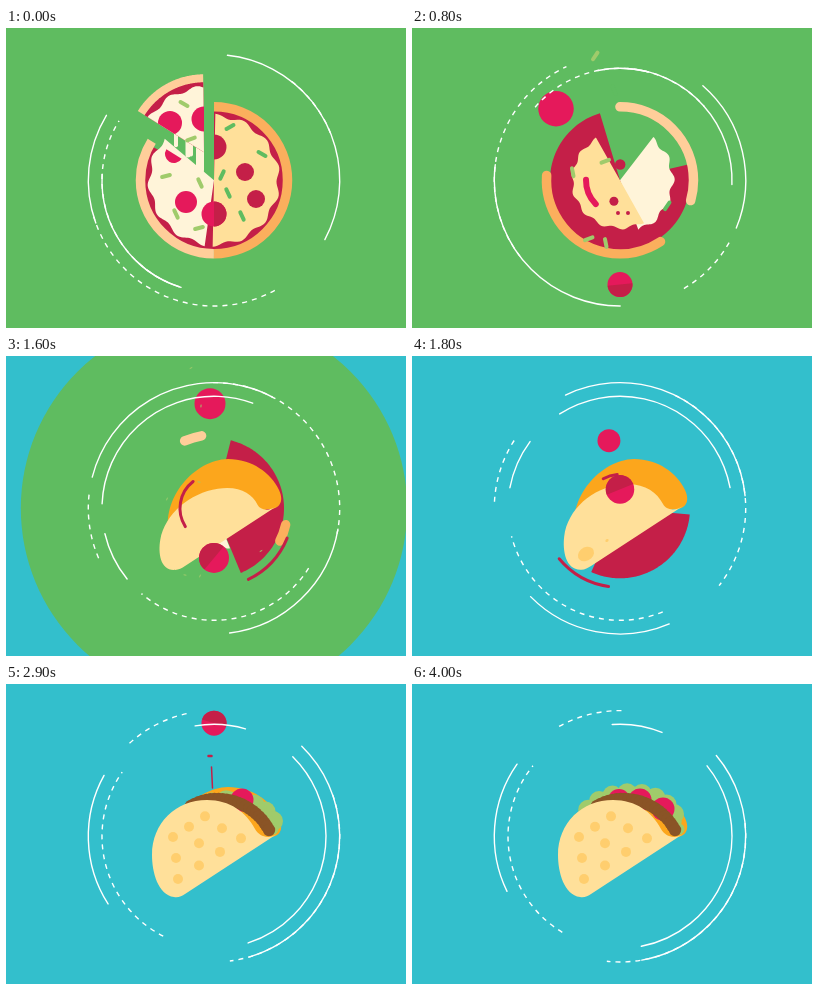
Write an HTML page with a canvas that moves like this. It is 400 px wide and 300 px high and loops after 4.1 s.

```html
<!DOCTYPE html>
<html lang="en">
<head>
<meta charset="utf-8">
<title>Pizza to taco</title>
<style>
html, body { margin: 0; width: 100%; height: 100%; overflow: hidden; background: #33bfcc; }
canvas { display: block; }
</style>
</head>
<body>
<canvas id="stage" width="400" height="300"></canvas>
<script>
const ctx = document.getElementById('stage').getContext('2d');
const LOOP = 4100, CX = 208, CY = 152.3, RAD = Math.PI / 180;
const C = {
  green: '#5fbc60', teal: '#33bfcc', leaf: '#a0cb6b', pink: '#e5195b', red: '#c41f48',
  cream: '#fff4d9', cheese: '#ffe09a', peach: '#ffce9a', crust: '#fbaf5d',
  shell: '#fca61c', dot: '#ffce6e', meat: '#8a5426'
};
let t = 0, spin = 0;

const mix = (a, b, p) => a + (b - a) * p;
const span = (a, b) => Math.max(0, Math.min(1, (t - a) / (b - a)));
const ramp = (a, b) => 0.5 - 0.5 * Math.cos(Math.PI * span(a, b));

// Smooth monotone curve through [time, value] points
function curve(points) {
  const n = points.length - 1;
  const slope = i => (points[i + 1][1] - points[i][1]) / (points[i + 1][0] - points[i][0]);
  const tangent = i => {
    if (i === 0) return slope(0);
    if (i === n) return slope(n - 1);
    const a = slope(i - 1), b = slope(i);
    return 2 * a * b / (a + b);
  };
  return time => {
    let i = 0;
    while (i < n - 1 && time >= points[i + 1][0]) i++;
    const [t0, v0] = points[i], [t1, v1] = points[i + 1];
    const h = t1 - t0, u = (time - t0) / h, w = 1 - u;
    return v0 * w * w * (1 + 2 * u) + v1 * u * u * (3 - 2 * u)
      + h * u * w * (w * tangent(i) - u * tangent(i + 1));
  };
}

// Shared turn: quick swing, then a slow drift
const spinAt = curve([[0, 0], [400, 0.091], [1200, 0.536], [1600, 0.758], [2200, 0.98], [2900, 0.989], [LOOP, 1.001]]);

function disc(x, y, r, color, from = 0, to = 360) {
  if (r <= 0) return;
  ctx.fillStyle = color;
  ctx.beginPath();
  ctx.arc(x, y, r, from * RAD, to * RAD);
  ctx.fill();
}

function line(x1, y1, x2, y2, width, color) {
  ctx.strokeStyle = color;
  ctx.lineWidth = width;
  ctx.lineCap = 'round';
  ctx.beginPath();
  ctx.moveTo(x1, y1);
  ctx.lineTo(x2, y2);
  ctx.stroke();
}

function arc(r, from, sweep, width, color, cap = 'round', dash = []) {
  if (sweep < 0.5 || width <= 0) return;
  ctx.strokeStyle = color;
  ctx.lineWidth = width;
  ctx.lineCap = cap;
  ctx.setLineDash(dash);
  ctx.beginPath();
  ctx.arc(CX, CY, r, from * RAD, (from + sweep) * RAD);
  ctx.stroke();
  ctx.setLineDash([]);
}

function sector(r, from, sweep, color, wave = 0) {
  if (sweep < 0.5) return;
  ctx.fillStyle = color;
  ctx.beginPath();
  ctx.moveTo(CX, CY);
  for (let a = 0; a <= sweep; a += sweep / 90) {
    const d = r + wave * Math.cos(14 * a * RAD), b = (from + a) * RAD;
    ctx.lineTo(CX + d * Math.cos(b), CY + d * Math.sin(b));
  }
  ctx.fill();
}

function blob(path, color) {
  ctx.fillStyle = color;
  ctx.fill(new Path2D(path));
}

// Row of discs along a cubic curve, drawn up to the given share
function bumps([x0, y0, x1, y1, x2, y2, x3, y3], n, r, color, share = 1) {
  const cubic = (a, b, c, d, u) => a * (1 - u) ** 3 + 3 * b * u * (1 - u) ** 2 + 3 * c * u * u * (1 - u) + d * u ** 3;
  for (let i = 0; i <= n * share; i++) {
    disc(cubic(x0, x1, x2, x3, i / n), cubic(y0, y1, y2, y3, i / n), r, color);
  }
}

function pop(start) {
  const p = span(start, start + 300);
  return p < 0.4 ? p * 5 : 2 - (p - 0.4) / 0.6;
}

function background() {
  ctx.fillStyle = C.teal;
  ctx.fillRect(0, 0, 400, 300);
  const p = span(1400, 1900);
  const eased = p < 0.5 ? 4 * p ** 3 : 1 - 4 * (1 - p) ** 3;
  disc(CX, CY, 261 * (1 - eased), C.green);
}

function pizza() {
  const cap = t < 150 ? 'butt' : 'round', rim = 9.5 * (1 - span(1600, 1900));
  const lag = spin ** 1.65, shrink = ramp(400, 1200);
  sector(70 * (1 - span(2200, 2500)), 270 + 590 * lag, 302 - 250 * lag, C.red);
  arc(73.5, 90 + 700 * spin ** 1.1, 122 - 188 * spin ** 2, rim, C.peach, cap);
  arc(73.5, 270 + 645 * spin ** 1.2, 180 - 232 * spin ** 1.2, rim, C.crust, cap);
  sector(mix(64.5, 41, shrink), 90 + 384 * spin ** 0.46, 122 * (1 - span(1200, 1750)), C.cream, 2);
  if (t < 1300) sector(mix(64.5, 31, shrink), 270 + 349 * spin ** 0.68, 180, C.cheese, mix(2, 1, shrink));
}

function slice() {
  if (t > 800) return;
  const lift = (t / 400) ** 1.5, y = -28 - 137 * lift;
  for (const [x, width, stretch] of [[170, 4, 85], [182, 5, 22], [185, 4, 70], [194, 8, 34]]) {
    const edge = CY + y - (198 - x) * 0.62;
    line(x, edge - 6, x, edge + 2.5 * width + stretch * t / 400, width, C.cream);
  }
  ctx.save();
  ctx.translate(-10, y);
  sector(78, 212, 58, C.peach);
  sector(70, 212, 58, C.red);
  sector(64.5, 212, 58, C.cream, 2);
  ctx.beginPath();
  ctx.moveTo(CX, CY);
  ctx.arc(CX, CY, 78, 212 * RAD, 270 * RAD);
  ctx.clip();
  disc(174, 123, 12, C.pink);
  disc(208, 119, 12.5, C.pink);
  ctx.restore();
}

function pepperoni() {
  const halved = t < 150, away = ramp(0, 1200), melt = ramp(0, 400), gone = 1 - span(1200, 1500);
  const ax = mix(239, 198, away), ay = mix(144, 134, away), bx = mix(250, 186, away), by = mix(171, 174, away);
  const bridge = 20 * span(200, 400) * (1 - span(500, 800));
  if (bridge) line(ax, ay, bx, by, bridge, C.red);
  disc(ax, ay, mix(9, 4, away) * gone, C.red);
  disc(bx, by, mix(9, 3, away) * gone, C.red);
  disc(mix(208, 254, melt), mix(119, 129, melt), 12.5 * (1 - span(0, 550)), C.red, halved ? -90 : 0, halved ? 90 : 360);
  const dx = mix(168, 211, melt), dy = mix(126, 185, melt), dr = mix(9, 6, melt) * (1 - span(400, 1000));
  if (halved) disc(dx, dy, dr, C.pink, 32, 212);
  else for (const side of [-5, 5]) disc(dx + side * melt, dy, dr, C.red);

  const swing = ramp(1200, 1600), drop = ramp(1200, 2200);
  disc(180 - 36 * melt + 60 * swing - 28 * ramp(1600, 2200),
    174 - 18 * melt - 150 * ramp(400, 1200) + 120 * drop,
    (11 + 9 * away - 13 * drop) * (1 - span(2200, 2500)), C.pink);
}

// x, y, angle, then where the herb flies to; the rest just melt away
const herbs = [
  [178, 76, 30, 185, 12], [224, 99, -30, 195, 50], [256, 126, 30, 255, 195], [160, 148, -15, 161, 143],
  [194, 155, 65, 193, 126], [170, 186, 65, 179, 219], [193, 200, -15, 194, 220],
  [185, 111, -20], [216, 147, -65], [222, 165, 65], [236, 188, 65]
];

function herb([x, y, angle, x1, y1]) {
  const flies = x1 !== undefined, p = flies ? ramp(0, 1200) : 0;
  const size = 1 - (flies ? span(1300, 1700) : span(300, 700));
  if (!size) return;
  const a = (angle + 125 * p) * RAD, dx = 4 * size * Math.cos(a), dy = 4 * size * Math.sin(a);
  const cx = mix(x, x1 ?? x, p), cy = mix(y, y1 ?? y, p);
  line(cx - dx, cy - dy, cx + dx, cy + dy, 4 * size, x < CX || t > 1000 ? C.leaf : C.green);
}

function ball() {
  if (t > 3200) return;
  const fall = Math.max(0, t - 2700);
  const y = 186 + 94 * ramp(0, 1200) - 261 * ramp(1170, 2340) + 0.0005 * fall ** 2;
  const r = 12.5 + 2.5 * Math.sin(Math.PI * span(1200, 2000)), turn = 290 * spin;
  disc(CX, y, r, C.pink);
  disc(CX, y, r, C.red, turn - 90, turn + 90);
  if (t > 2800 && t < 3000) {
    line(202.5, 72, 205.5, 72, 2.5, C.red);
    line(205.5, 83, 206.5, 104, 1.5, C.red);
  }
}

function fillings() {
  if (t > 2400) {
    const sink = 1 - ramp(2300, 3500);
    ctx.save();
    ctx.translate(10 * sink, 14 * sink);
    bumps([169, 138, 182, 101, 248, 101, 262, 130], 8, 10, C.leaf);
    ctx.restore();
    bumps([225, 113, 246, 112, 262, 128, 267, 145], 7, 5.5, C.leaf, span(2500, 2900));
  }
  disc(mix(236, 228, ramp(2900, 3500)), 116, 11.5 * span(2650, 2850), C.pink);
  disc(207, 116, 11 * span(3000, 3200), C.pink);
  disc(251, 125, 11.5 * span(3100, 3350), C.pink);
  if (t > 2050) {
    if (t < 2500) line(194, 109, 198, 103, 4, C.leaf);
    bumps([185, 122, 212, 106, 248, 118, 263, 146], 22, 6.2, C.meat, ramp(2050, 2700));
  }
}

// Slanted rows of spots that pop up one after the other
function spots() {
  let start = 1630;
  for (const [x, y, count, step] of [[172, 195, 4, 21], [170, 174, 3, 23], [167, 153, 3, 16]]) {
    for (let i = 0; i < count; i++) {
      disc(x + i * step, y - i * step * 0.645, 5 * pop(start), C.dot);
      start += start < 2080 ? 150 : 60;
    }
  }
}

function taco() {
  if (t < 1300) return;
  const grow = span(1250, 1600), scale = mix(0.45, 1, grow), tilt = -33 * RAD;
  ctx.save();
  ctx.translate(CX, CY);
  ctx.scale(scale, scale);
  ctx.translate(-CX, -CY);
  blob('M163 180C155 142 188 104 222 103C246 103 265 117 273 134C279 147 272 154 262 153Z', C.shell);
  fillings();
  // The front half rises from its straight edge
  ctx.translate(179, 210);
  ctx.rotate(tilt);
  ctx.scale(1, mix(0.7, 1, ramp(1600, 2200)));
  ctx.rotate(-tilt);
  ctx.translate(-179, -210);
  blob('M168 213C152 211 146 188 146 171C146 139 170 116 201 116C224 116 240 128 249 145'
    + 'C253 152 262 156 271 150L179 210C176 212 172 214 168 213Z', C.cheese);
  spots();
  ctx.restore();
}

function swirls() {
  const whirl = 1 - (1 - span(1200, 2400)) ** 2;
  arc(79, 164 + 392 * whirl, 42 * span(1000, 1400) * (1 - span(2250, 2500)), 3, C.red);
  const p = (t - 1200) / 400;
  arc(34, 186 * p - 39, (155 - 70 * p) * span(700, 1200) * (1 - span(1600, 2000)),
    mix(6, 3, span(1200, 1600)), t < 1400 ? C.pink : C.red);

  const white = (r, from, sweep, dash) => arc(r, from, sweep, 1.4, '#fff', dash ? 'butt' : 'round', dash);
  const dashes = [5, 5], outer = 61 + 255 * spin + 0.0095 * t;
  white(125.7, -84 + 598 * spin, 112 - 51 * spin);
  white(125.7, 160 + 520 * spin, 51 + 69 * spin);
  white(125.7, outer, 102, dashes);
  white(125.7, outer - 113, 31, dashes);
  white(112, 114 + 367 * spin, 98, dashes);
  white(112, 107 + 574 * spin, 76 + 42 * spin);
  white(112, 108 + 518 * spin, 26);
}

function draw() {
  background();
  pizza();
  slice();
  pepperoni();
  if (t >= 2500) ball();
  taco();
  if (t < 2500) ball();
  herbs.forEach(herb);
  swirls();
}

const start = performance.now();
function frame() {
  t = (performance.now() - start) % LOOP;
  spin = spinAt(t);
  draw();
  requestAnimationFrame(frame);
}
frame();
</script>
</body>
</html>
```
